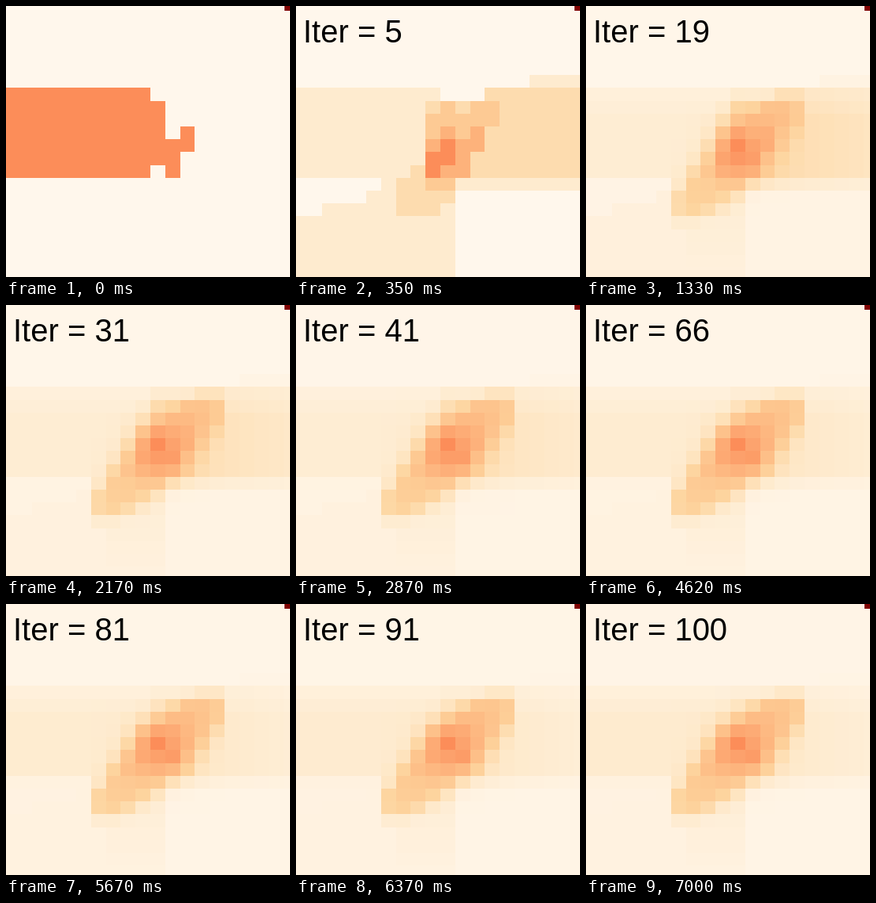
An HTML page with a canvas for the animation above (7.07 s loop, 360 by 342 pixels).

```html
<!DOCTYPE html>
<html lang="en">
<head>
<meta charset="utf-8">
<title>Averaged masks</title>
<style>
  html, body { margin: 0; width: 100%; height: 100%; overflow: hidden; background: #fff7ec; }
  canvas, svg { position: absolute; left: 0; top: 0; display: block; }
  text { font: 40px "Liberation Sans", Arial, sans-serif; fill: #000; }
</style>
</head>
<body>
<canvas id="stage" width="360" height="342"></canvas>
<svg width="360" height="342"><text id="label" x="9" y="46"></text></svg>
<script>
const FRAME_MS = 70, FRAMES = 101;
const FIRST_COL = -1, LAST_COL = 18, FIRST_ROW = -1, LAST_ROW = 20;
const CENTER_COL = 9, CENTER_ROW = 10;

const ctx = document.getElementById('stage').getContext('2d');
const label = document.getElementById('label');

const lerp = (a, b, t) => a + (b - a) * t;
const clamp = (v, lo, hi) => Math.max(lo, Math.min(hi, v));
const colX = c => clamp(Math.floor(14.25 + 18.81 * c), 0, 360);
const rowY = r => clamp(Math.round(6.2 + 16.2 * r), 0, 342);

const RAMP = [[255, 247, 236], [254, 232, 200], [253, 212, 158], [253, 187, 132], [252, 141, 89]];
function color(v) {
  const p = clamp(v, 0, 1) * 4, i = Math.min(3, Math.floor(p));
  return `rgb(${RAMP[i].map((a, k) => Math.round(lerp(a, RAMP[i + 1][k], p - i)))})`;
}

// Ragged end of the left band: middle and half height of each column.
const RAGGED = [[-1, 2], [1, 1], [-.5, .5]];

// Binary masks, in cells from the centre; all of them contain the centre.
const MASKS = [
  function leftBand(dx, dy) {
    if (dx < 0) return dy >= -4 && dy <= 2;
    const end = RAGGED[dx];
    return !!end && Math.abs(dy - end[0]) <= end[1];
  },
  (dx, dy) => dy >= -5 && dy <= 3 && dx >= Math.max(-1, -3 * dy - 9),
  (dx, dy) => dy >= 0 && dx <= 0 && dx >= -dy - .12 * dy * dy,
  (dx, dy) => dy >= -3 && dy <= 5 && dx <= 2 - dy / 2 && dx >= (dy > 2 ? -3 : -1),
  (dx, dy) => dy >= -4 && dy <= 2 && dx >= Math.max(-1, -1 - dy)
];
const maskMean = (count, dx, dy) =>
  MASKS.slice(0, count).filter(mask => mask(dx, dy)).length / count;

// Soft surroundings of the ridge, levelling out as n grows.
function background(dx, dy, n) {
  const decay = Math.exp(-n / 30);
  if (dy < -4) return .02 + .00025 * n;
  if (dy > 3) {
    const glow = dx >= -3 && dx <= 0 ? .06 * Math.max(0, 1 - (dy - 5) / 5) : 0;
    return (dx <= 0 ? .08 : .05 + .06 * decay) + glow;
  }
  const band = dx < 0 ? .15 + .0005 * n : (.17 + .3 * decay) * (1.4 - .07 * dx);
  const edge = dy === -4 ? .6 : dy === -3 ? .8 : dy === 3 ? .5 : 1;
  return band * edge;
}

// Diagonal ridge: u runs along it, w across it.
function ridge(dx, dy) {
  if (Math.abs(dx) > 4 || dy < -4 || dy > 6) return 0;
  const u = (dx - dy) / 2, w = (dx + dy) / 2, far = Math.abs(u);
  const offset = Math.abs(w - .4 + .06 * u) / (1.6 - .16 * far);
  const fringe = dy === -4 || dy === 6 ? .28 : 1;
  return fringe * (1 - .1 * Math.abs(w)) / (1 + .25 * far) / (1 + offset ** 6);
}

function level(dx, dy, n) {
  const count = Math.min(n, MASKS.length);
  const base = background(dx, dy, n);
  const settled = base + (1 - base) * ridge(dx, dy);
  return lerp(settled, maskMean(count, dx, dy), count / n);
}

function draw(step) {
  const n = Math.max(1, step);
  for (let r = FIRST_ROW; r <= LAST_ROW; r++) {
    for (let c = FIRST_COL; c <= LAST_COL; c++) {
      const x = colX(c), y = rowY(r);
      ctx.fillStyle = color(level(c - CENTER_COL, r - CENTER_ROW, n));
      ctx.fillRect(x, y, colX(c + 1) - x, rowY(r + 1) - y);
    }
  }
  ctx.fillStyle = '#7f0000';
  ctx.fillRect(353, 0, 7, 6);
  label.textContent = step ? `Iter = ${step}` : '';
}

let shown = -1;
function tick() {
  const step = Math.floor(performance.now() / FRAME_MS) % FRAMES;
  if (step !== shown) draw(shown = step);
  requestAnimationFrame(tick);
}
tick();
</script>
</body>
</html>
```
